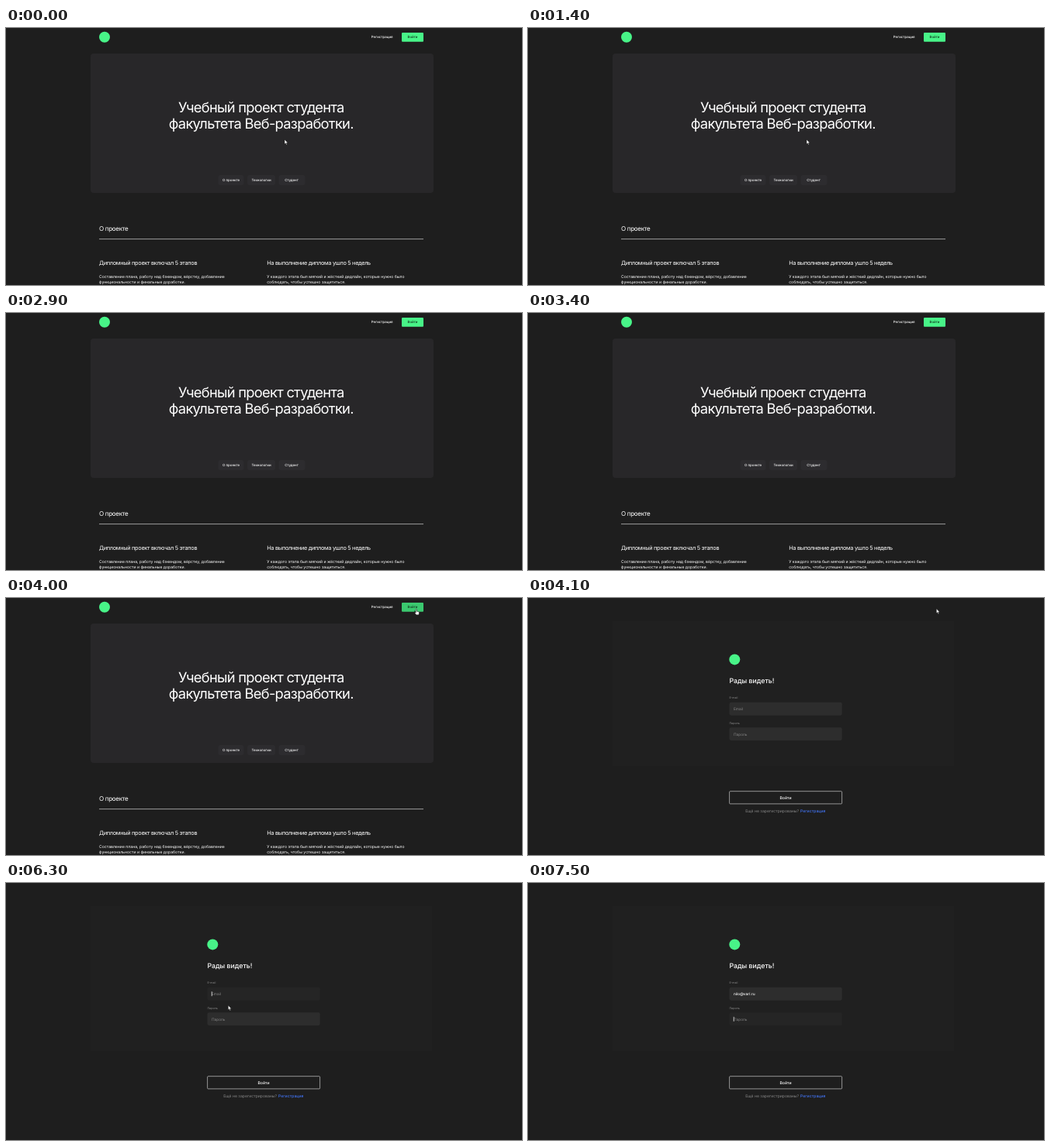
Write an HTML page that moves like this. It is 665x332 px and loops after 8 s.

```html
<!DOCTYPE html>
<html lang="ru">
<head>
<meta charset="utf-8">
<title>Учебный проект</title>
<style>
  html, body { margin: 0; width: 100%; height: 100%; overflow: hidden; background: #1e1e1e; }
  svg { display: block; width: 665px; height: 332px; }
  text { font-family: Inter, Roboto, sans-serif; fill: #fff; text-rendering: geometricPrecision; white-space: pre; }
  .mid { text-anchor: middle; }
  .hero { font-size: 18.33px; letter-spacing: -.04em; }
  .section { font-size: 8.07px; letter-spacing: -.04em; }
  .sub { font-size: 7.33px; letter-spacing: -.04em; }
  .body { font-size: 5.13px; }
  .nav { font-size: 4.4px; font-weight: 500; }
  .title { font-size: 8.8px; font-weight: 500; }
  .label { font-size: 3.67px; fill: #8b8b8b; }
  .input { font-size: 4.77px; }
  .strong { font-weight: 500; }
  .gray { fill: #858585; }
  .link { fill: #4274f5; }
  .dark { fill: #10301c; }
  .pill { fill: #2d2c2f; }
  .brand { fill: #48f488; }
</style>
</head>
<body>
<svg viewBox="0 0 665 332">
  <rect width="665" height="332" fill="#1e1e1e"/>

  <g id="home">
    <circle class="brand" cx="127" cy="11.8" r="7"/>
    <text class="nav" x="470.8" y="13.4">Регистрация</text>
    <rect id="enter" x="510" y="6" width="28" height="11.8" rx="1.1"/>
    <text class="nav mid dark" x="524" y="13.4">Войти</text>

    <rect x="109" y="33" width="442" height="180" rx="4" fill="#282729"/>
    <text class="hero mid" x="328.8" y="108.8">Учебный проект студента</text>
    <text class="hero mid" x="328.8" y="130.1">факультета Веб-разработки.</text>
    <rect class="pill" x="273.5" y="190" width="33" height="13" rx="3"/>
    <rect class="pill" x="311" y="190" width="36" height="13" rx="3"/>
    <rect class="pill" x="351.5" y="190" width="34" height="13" rx="3"/>
    <text class="nav mid" x="290" y="198.2">О проекте</text>
    <text class="nav mid" x="329" y="198.2">Технологии</text>
    <text class="nav mid" x="368" y="198.2">Студент</text>

    <text class="section" x="120" y="262.2">О проекте</text>
    <path d="M120 272.6H538" stroke="#d0d0d0" stroke-width=".7"/>
    <text class="sub" x="120" y="305.7">Дипломный проект включал 5 этапов</text>
    <text class="body" x="120" y="322.7">Составление плана, работу над бэкендом, вёрстку, добавление</text>
    <text class="body" x="120" y="330">функциональности и финальные доработки.</text>
    <text class="sub" x="336.2" y="305.7">На выполнение диплома ушло 5 недель</text>
    <text class="body" x="336.2" y="322.7">У каждого этапа был мягкий и жёсткий дедлайн, которые нужно было</text>
    <text class="body" x="336.2" y="330">соблюдать, чтобы успешно защититься.</text>
  </g>

  <g id="login">
    <rect x="109" y="30" width="440" height="187" fill="#202020"/>
    <circle class="brand" cx="266.3" cy="79.4" r="7"/>
    <text class="title" x="259.4" y="109.6">Рады видеть!</text>
    <text class="label" x="259.4" y="130.2">E-mail</text>
    <rect id="emailBox" x="259.5" y="134.8" width="145.2" height="16.9" rx="2.4"/>
    <text id="email" x="265" y="144.9"></text>
    <text class="label" x="259.4" y="162.6">Пароль</text>
    <rect id="passBox" x="259.5" y="167.2" width="145.2" height="16.9" rx="2.4"/>
    <text class="input gray" x="265" y="177.5">Пароль</text>
    <rect id="caret" x="264.8" width=".7" height="6" fill="#fff"/>
    <rect x="259.6" y="249.7" width="145" height="16.2" rx="1" fill="none" stroke="#c8c8c8" stroke-width=".7"/>
    <text class="body strong mid" x="332" y="259.7">Войти</text>
    <text class="body gray" x="280.2" y="277.1">Ещё не зарегистрированы?</text>
    <text class="body link strong" x="351" y="277.1">Регистрация</text>
  </g>

  <g id="cursor" fill="#fff" stroke="#111" stroke-width=".5" stroke-linejoin="round">
    <path id="arrow" d="M0 0V6L1.4 4.8 2.3 6.9 3.3 6.5 2.4 4.5H4.3Z"/>
    <path id="hand" d="M-.6 .4Q0-.5 .6 .4V3L3 3.6Q3.8 3.9 3.7 4.8L3.2 7.6H-.2L-2 4.9Q-2-.0 -2 4.5Q-1.5 3.8-.6 4.8Z"/>
  </g>
</svg>

<script>
const LOOP = 8000, STEP = 100;
const LOGIN_AT = 4100, TYPE_AT = 7100, TAB_AT = 7500;
const ADDRESS = 'nilo@varl.ru';
const part = Object.fromEntries([...document.querySelectorAll('[id]')].map(el => [el.id, el]));

// Each stretch of visible pointer travel: [time, x, y]; gaps are over text, where it vanishes.
const trips = [
  [[0, 359, 144], [1500, 359, 144], [1600, 365, 137]],
  [[2100, 384, 138], [2500, 402, 236], [2900, 428, 334]],
  [[3000, 428, 331], [3500, 431, 66], [3800, 528.8, 14.2], [4000, 528.8, 14.2]],
  [[4100, 526.3, 13.8], [4200, 515, 22], [4600, 335, 141], [4700, 312, 155], [4900, 305, 153]],
  [[6200, 288.5, 153], [6300, 286.3, 158], [6400, 285, 163]],
];

const clamp = v => Math.min(1, Math.max(0, v));
const show = (el, on) => el.setAttribute('display', on ? 'inline' : 'none');
const gray = v => `rgb(${[v, v, v].map(Math.round)})`;

function pointerAt(t) {
  const trip = trips.find(p => t >= p[0][0] && t <= p[p.length - 1][0]);
  if (!trip) return null;
  const i = Math.max(1, trip.findIndex(p => p[0] >= t));
  const [a, b] = [trip[i - 1], trip[i]];
  const k = (t - a[0]) / (b[0] - a[0]);
  return [a[1] + (b[1] - a[1]) * k, a[2] + (b[2] - a[2]) * k];
}

function caretOn(t) {
  if (t >= TYPE_AT) return true;
  return (t >= 5200 && t < 5800) || (t >= 6300 && t < 6800);
}

function typed(t) {
  if (t < TYPE_AT) return '';
  return t >= TAB_AT ? ADDRESS : ADDRESS.slice(0, 1 + (t - TYPE_AT) / STEP);
}

function render(time) {
  const t = Math.floor(time % LOOP / STEP) * STEP;
  const atLogin = t >= LOGIN_AT;
  show(part.home, !atLogin);
  show(part.login, atLogin);

  const pos = pointerAt(t);
  const overButton = !atLogin && t >= 3800;
  show(part.cursor, pos);
  if (pos) part.cursor.setAttribute('transform', `translate(${pos})`);
  show(part.arrow, !overButton);
  show(part.hand, overButton);
  part.enter.setAttribute('fill', overButton ? '#3bc86f' : '#48f488');

  // Fields darken while hovered.
  const emailHover = clamp((t - 4400) / 300) - clamp((t - 6300) / 300);
  const passHover = clamp((t - 6400) / 200);
  part.emailBox.setAttribute('fill', gray(45 - 8 * emailHover));
  part.passBox.setAttribute('fill', gray(45 - 8 * passHover));

  const value = typed(t);
  part.email.textContent = value || 'Email';
  part.email.setAttribute('class', value ? 'input strong' : 'input gray');

  const inPassword = t >= TAB_AT;
  show(part.caret, caretOn(t));
  part.caret.setAttribute('y', inPassword ? 172.8 : 140.2);
  const offset = value && !inPassword ? part.email.getComputedTextLength() : 0;
  part.caret.setAttribute('x', 264.8 + offset);
}

const start = performance.now();
function tick() {
  render(performance.now() - start);
  requestAnimationFrame(tick);
}
tick();
</script>
</body>
</html>
```
